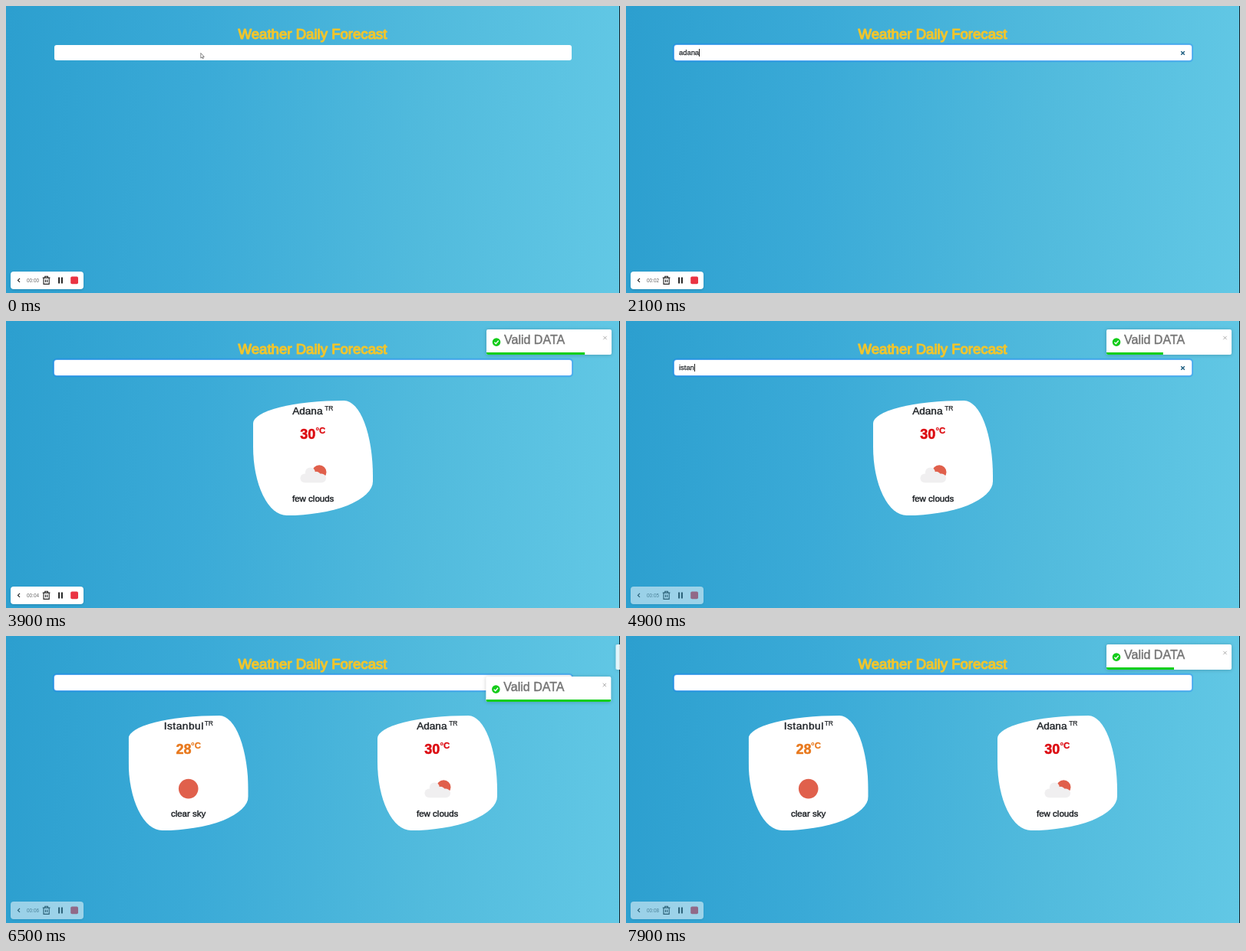
Write an HTML page that moves like this. It is 800x375 px and loops after 8 s.

```html
<!DOCTYPE html>
<html lang="en">
<head>
<meta charset="utf-8">
<title>Weather Daily Forecast</title>
<style>
  html, body { margin: 0; width: 100%; height: 100%; overflow: hidden; }
  body {
    position: relative;
    background: linear-gradient(93deg, #2c9fcf 0%, #3aaad7 31%, #52bbdd 69%, #62c8e5 100%);
    font-family: "Liberation Sans", Arial, sans-serif;
  }
  svg { display: block; overflow: hidden; }
  .layer { position: absolute; left: 0; top: 0; }

  /* every animation shares one 8 s loop */
  .step { animation: 8s step-end infinite; }
  .flow { animation: 8s linear infinite; }

  text { stroke: currentColor; fill: currentColor; stroke-linejoin: round; stroke-width: .45px; }
  .title { color: #f0c52e; font-size: 18.6px; stroke-width: 1.2px; }

  /* search field */
  .field, .ring {
    position: absolute; left: 62.5px; top: 51.2px; width: 674px; height: 19.8px;
    border-radius: 3px; box-sizing: border-box;
  }
  .ring {
    box-shadow: 0 0 0 .6px #86b7fe, 0 0 0 2.2px rgba(13, 110, 253, .27);
    animation-name: ring;
  }
  .field {
    background: #fff; padding-left: 6.5px; color: #212529;
    font-size: 9.4px; line-height: 19.6px; white-space: pre;
  }
  .field::before {
    content: ""; -webkit-text-stroke: .25px #212529;
    animation: typed 8s step-end infinite;
  }
  .field::after {
    content: ""; display: inline-block; width: 1px; height: 10px;
    margin-left: .2px; vertical-align: -2px; background: #222;
    animation: caret 8s step-end infinite;
  }
  .clear { animation-name: clear; }
  .pointer { animation-name: pointer; }
  @keyframes ring { 0%, 9.9% { opacity: 0; } 11.6%, 100% { opacity: 1; } }
  @keyframes typed {
    0% { content: ""; }
    17.4% { content: "a"; }
    21.1% { content: "ad"; }
    26% { content: "adana"; }
    31.1% { content: ""; }
    53.6% { content: "i"; }
    56.1% { content: "is"; }
    57.4% { content: "ist"; }
    58.6% { content: "ista"; }
    61% { content: "istan"; }
    63.6% { content: "istanb"; }
    64.9% { content: "istanbu"; }
    67.4% { content: "istanbul"; }
    71.1%, 100% { content: ""; }
  }
  @keyframes caret {
    0%, 32.4%, 47.4%, 78.7%, 93.7%, 100% { opacity: 0; }
    9.9%, 39.9%, 53.6%, 86.2% { opacity: 1; }
  }
  @keyframes clear {
    0%, 31.1%, 71.1%, 100% { opacity: 0; }
    17.4%, 53.6% { opacity: 1; }
  }
  @keyframes pointer {
    0%, 8.7% { transform: none; opacity: 1; }
    13.7%, 17.3% { transform: translateY(6px); opacity: 1; }
    17.4%, 100% { transform: translateY(6px); opacity: 0; }
  }

  /* weather cards */
  .card {
    position: absolute; left: 321.8px; top: 104px; width: 156.4px; height: 149.6px;
    background: #fff; color: #212529;
    border-radius: 76% 24% 72% 28% / 20% 66% 30% 60%;
  }
  .card text { text-anchor: start; }
  .city { font-size: 13.6px; }
  .land { font-size: 8.4px; stroke-width: .25px; }
  .temp { font-size: 18px; stroke-width: .5px; font-weight: bold; }
  .unit { font-size: 11.4px; stroke-width: .3px; font-weight: bold; }
  .sky { font-size: 11.5px; }
  .wide { letter-spacing: .55px; }
  .hot { color: #dc0a10; }
  .warm { color: #e8781c; }
  .first { animation-name: first; }
  .second { transform: translateX(-162.3px); animation-name: second; }
  @keyframes first {
    0% { opacity: 0; transform: none; }
    34.9% { opacity: 1; transform: none; }
    72.3%, 100% { opacity: 1; transform: translateX(162px); }
  }
  @keyframes second { 0% { opacity: 0; } 72.3%, 100% { opacity: 1; } }

  /* toasts */
  .toast {
    position: absolute; left: 626px; top: 10.5px; width: 162.5px; height: 33px;
    background: #fff; border-radius: 2px; overflow: hidden;
    box-shadow: 0 .5px 5px rgba(0, 0, 0, .2); color: #757575;
  }
  .toast text { font-size: 8.3px; stroke-width: .2px; }
  .bar {
    position: absolute; left: 0; bottom: 0; width: 100%; height: 2.6px;
    background: #12cf18; transform-origin: left;
  }
  .old { animation-name: old; }
  .old .bar { animation-name: oldbar; }
  .lift { animation-name: lift; }
  .new { animation-name: new; }
  .new .bar { animation-name: newbar; }
  @keyframes old {
    0%, 33.75% { transform: translateX(200px); opacity: 1; }
    35% { transform: translateX(-8px); }
    36.25% { transform: translateX(2px); }
    37.5% { transform: translateX(-2px); }
    38.75%, 78.5% { transform: none; }
    80.25% { transform: translateX(-10px); opacity: 1; animation-timing-function: ease; }
    87.25%, 100% { transform: translateX(1012px); opacity: 0; }
  }
  @keyframes new {
    0%, 72.75% {
      transform: translateX(1518px);
      animation-timing-function: cubic-bezier(.215, .61, .355, 1);
    }
    78% { transform: translateX(-12px); }
    79.3% { transform: translateX(5px); }
    80.6% { transform: translateX(-2.5px); }
    81.5%, 100% { transform: none; }
  }
  @keyframes lift {
    0%, 87.25% { transform: translateY(42px); animation-timing-function: ease; }
    91%, 100% { transform: none; }
  }
  @keyframes oldbar { 0%, 40.75% { transform: none; } 78.25%, 100% { transform: scaleX(0); } }
  @keyframes newbar { 0%, 81.5% { transform: none; } 100% { transform: scaleX(.507); } }

  /* recorder */
  .recorder {
    position: absolute; left: 6px; top: 347px; width: 94.5px; height: 23px;
    background: #fff; border-radius: 4px; box-shadow: 0 1px 3px rgba(0, 0, 0, .15);
    animation-name: dim;
  }
  .clock {
    position: absolute; left: 21px; top: 0; color: #666;
    font-size: 6.4px; line-height: 23px;
  }
  .clock::after { content: "0"; animation: clock 8s step-end infinite; }
  @keyframes dim { 0%, 50% { opacity: 1; } 53%, 100% { opacity: .52; } }
  @keyframes clock {
    0% { content: "0"; }
    9.9% { content: "1"; }
    22.4% { content: "2"; }
    34.9% { content: "3"; }
    47.4% { content: "4"; }
    59.9% { content: "5"; }
    72.3% { content: "6"; }
    84.9% { content: "7"; }
    97.4%, 100% { content: "8"; }
  }
  .edge { position: absolute; right: 0; top: 0; width: 1px; height: 100%; background: #14232b; }
</style>
</head>
<body>
  <svg width="0" height="0" style="position:absolute">
    <defs>
      <g id="note">
        <circle cx="13" cy="16.6" r="5.3" fill="#14cb1a"/>
        <path d="M10.4 16.8l1.9 1.9 3.4-3.9" fill="none" stroke="#fff" stroke-width="1.3"/>
        <path d="M152.3 8.8l4.4 4.4m0-4.4l-4.4 4.4" stroke="#999" stroke-width=".8"/>
        <text x="23" y="19.4">Valid DATA</text>
      </g>
    </defs>
  </svg>

  <svg class="layer" width="800" height="375">
    <text class="title" x="399.5" y="43.2" text-anchor="middle">Weather Daily Forecast</text>
  </svg>

  <div class="ring flow"></div>
  <div class="field"></div>
  <svg class="layer" width="800" height="375">
    <path class="clear step" d="M723.2 59.2l4.6 4.6m0-4.6l-4.6 4.6" stroke="#1c5d80" stroke-width="1.4"/>
    <path class="pointer flow" d="M253.8 61.5v6.6l1.5-1.3 1 2.1 1-.5-1-2h2z"
          fill="#fff" stroke="#555" stroke-width=".7"/>
  </svg>

  <div class="card first step">
    <svg width="156" height="149">
      <text class="city" x="51.2" y="17.6">Adana</text>
      <text class="land" x="93.2" y="12.6">TR</text>
      <g class="hot">
        <text class="temp" x="61.2" y="49.6">30</text>
        <text class="unit" x="81.4" y="42.6">°C</text>
      </g>
      <circle cx="86.2" cy="93.6" r="9.3" fill="#e0604c"/>
      <g fill="#f0eff0">
        <rect x="61.4" y="95.4" width="33.6" height="11.8" rx="5.9"/>
        <circle cx="74.4" cy="94" r="6.6"/>
        <circle cx="82.4" cy="98.4" r="5.6"/>
      </g>
      <text class="sky" x="51" y="132">few clouds</text>
    </svg>
  </div>

  <div class="card second step">
    <svg width="156" height="149">
      <text class="city wide" x="46" y="17.6">Istanbul</text>
      <text class="land" x="99" y="12.6">TR</text>
      <g class="warm">
        <text class="temp" x="61.8" y="49.6">28</text>
        <text class="unit" x="81.4" y="42.6">°C</text>
      </g>
      <circle cx="78" cy="95.6" r="12.8" fill="#e0604c"/>
      <text class="sky" x="55.2" y="132">clear sky</text>
    </svg>
  </div>

  <div class="recorder flow">
    <div class="clock">00:0</div>
    <svg width="94" height="23" fill="none" stroke="#222" stroke-width="1.2">
      <path d="M12 8.9l-2.5 2.5 2.5 2.5"/>
      <path d="M41.8 8.1h9.6M44.8 8V6.2h3.6V8M43 8.2v8.2h7.2V8.2M45.5 10.6v3.4m2.2-3.4v3.4" stroke-width="1.1"/>
      <path d="M63.1 7.4v8M66.9 7.4v8" stroke-width="2"/>
      <rect x="78.2" y="6.5" width="9.8" height="9.8" rx="1.8" fill="#ea3443" stroke="none"/>
    </svg>
  </div>

  <div class="edge"></div>

  <div class="toast old flow">
    <svg width="162" height="33"><use href="#note"/></svg>
    <div class="bar flow"></div>
  </div>
  <div class="layer lift flow">
    <div class="toast new flow">
      <svg width="162" height="33"><use href="#note"/></svg>
      <div class="bar flow"></div>
    </div>
  </div>
</body>
</html>
```
